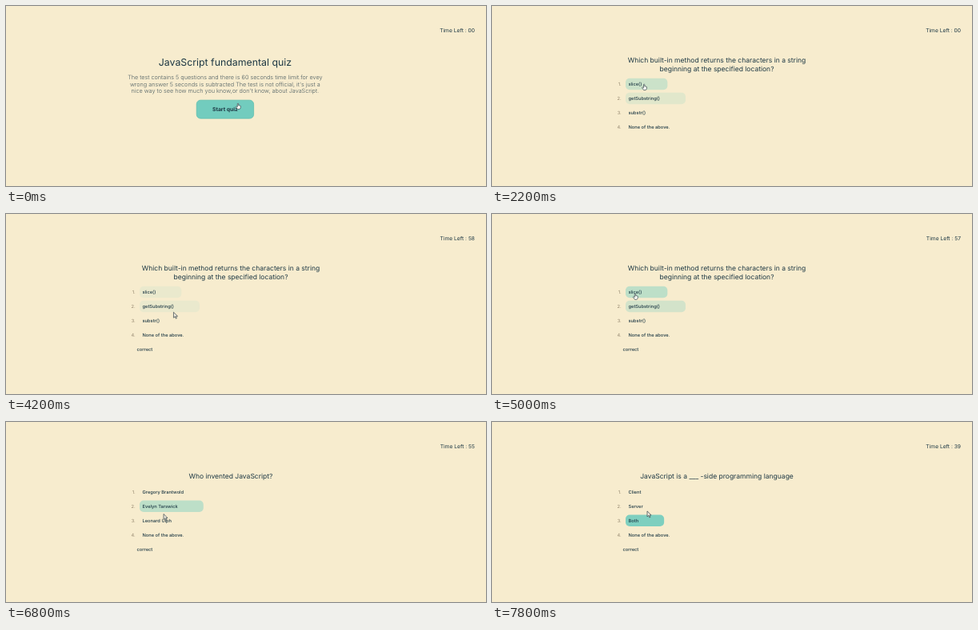
Animation of 600x226 px, one loop 8 s. Source, as an HTML page with a canvas:

```html
<!DOCTYPE html>
<html lang="en">
<head>
<meta charset="utf-8">
<title>JavaScript quiz</title>
<style>
  html, body { margin: 0; height: 100%; overflow: hidden; background: #f7ecce; }
  canvas { display: block; width: 600px; height: 226px; }
</style>
</head>
<body>
<canvas id="stage"></canvas>
<script>
const LOOP = 8000, STEP = 200, FADE = 600;
const BG = '#f7ecce', TEAL = '#72ccbe', INK = '#1d3844';
const OPTION_FONT = { size: 5.72, weight: 500 };
const LINE = 10.2, ROW = 18;

const canvas = document.getElementById('stage');
const ctx = canvas.getContext('2d');
const ratio = window.devicePixelRatio || 1;
canvas.width = 600 * ratio;
canvas.height = 226 * ratio;
ctx.scale(ratio, ratio);

const NONE = 'None of the above.';
const questions = [
  { from: 1600,
    title: ['Which built-in method returns the characters in a string',
            'beginning at the specified location?'],
    options: ['slice()', 'getSubstring()', 'substr()', NONE] },
  { from: 5900,
    title: ['Who invented JavaScript?'],
    options: ['Gregory Brantwold', 'Evelyn Tarswick', 'Leonard Ulph', NONE] },
  { from: 7200,
    title: ['JavaScript is a ___ -side programming language'],
    options: ['Client', 'Server', 'Both', NONE] },
];

// The pointer eases from stop to stop: time, x, y of its tip.
const stops = [
  [0, 290, 122], [700, 114, 217], [1400, 279, 126],
  [2300, 187, 97], [3600, 187, 97], [3800, 213, 126], [4000, 213, 126],
  [5000, 179, 99.8], [6400, 179, 99.8], [6800, 197, 115.5],
  [7700, 192, 122], [7800, 194, 111.9],
];

function pointerAt(t) {
  const next = stops.findIndex(stop => stop[0] > t);
  const [t1, x1, y1] = stops.at(next < 0 ? -1 : next);
  const [t0, x0, y0] = stops.at(next < 0 ? -1 : Math.max(next - 1, 0));
  const u = t1 > t0 ? (t - t0) / (t1 - t0) : 0;
  const eased = u * u * (3 - 2 * u);
  return { x: x0 + (x1 - x0) * eased, y: y0 + (y1 - y0) * eased };
}

const questionAt = t => questions.findLast(question => t >= question.from);

function setFont({ size, weight = 400 }) {
  ctx.font = `${weight} ${size}px Inter, sans-serif`;
  ctx.textRendering = 'geometricPrecision';
}

function text(string, x, y, font, align = 'left', color = INK) {
  setFont(font);
  ctx.textAlign = align;
  ctx.fillStyle = color;
  ctx.fillText(string, x, y);
}

function optionBox({ title, options }, row) {
  setFont(OPTION_FONT);
  const middle = 77.6 + title.length * LINE + row * ROW;
  return { middle, width: ctx.measureText(options[row]).width + 35.5 };
}

// Row under the pointer, or -1.
function rowAt(t) {
  const question = questionAt(t);
  if (!question) return -1;
  const { x, y } = pointerAt(t);
  return question.options.findIndex((_, row) => {
    const { middle, width } = optionBox(question, row);
    return x > 167 && x < 167 + width && Math.abs(y - middle) < 6;
  });
}

// A row's tint is the share of the last FADE ms that the pointer spent on it.
function hoverAmounts(t) {
  const amounts = [0, 0, 0, 0], samples = 30;
  for (let i = 0; i < samples; i++) {
    const row = rowAt(t - i * FADE / samples);
    if (row >= 0) amounts[row] += 1 / samples;
  }
  return amounts;
}

function roundBox(x, y, width, height) {
  ctx.beginPath();
  ctx.roundRect(x, y, width, height, 5);
  ctx.fillStyle = TEAL;
  ctx.fill();
}

function drawHome() {
  text('JavaScript fundamental quiz', 273.9, 75, { size: 12.33 }, 'center');
  ['The test contains 5 questions and there is 60 seconds time limit.for evey',
   "wrong answer 5 seconds is subtracted The test is not official, it's just a",
   "nice way to see how much you know,or don't know, about JavaScript."]
    .forEach((line, i) => text(line, 273.8, 92 + i * 8.6,
      { size: 7.25, weight: 300 }, 'center', '#4b5c60'));
  roundBox(238.2, 118.2, 71.4, 23);
  ctx.strokeStyle = '#58bcad';
  ctx.lineWidth = 0.7;
  ctx.stroke();
  text('Start quiz', 274, 132, { size: 6.75, weight: 700 }, 'center');
}

function drawQuestion(question, t) {
  question.title.forEach((line, i) =>
    text(line, 281, 71.3 + i * LINE, { size: 8.53 }, 'center'));
  const hover = hoverAmounts(t);
  question.options.forEach((option, row) => {
    const { middle, width } = optionBox(question, row);
    ctx.globalAlpha = hover[row];
    roundBox(167, middle - 7.2, width, 14.4);
    ctx.globalAlpha = 1;
    text(`${row + 1}.`, 161.7, middle + 2, { size: 5.72 }, 'right', '#91846c');
    text(option, 170.5, middle + 2, OPTION_FONT);
  });
  if (t >= 2800) {
    const { middle } = optionBox(question, 3);
    text('correct', 163.5, middle + ROW + 2, OPTION_FONT);
  }
}

const arrow = new Path2D('M0 0V7L1.7 5.4L2.8 8L4 7.5L2.9 5H5.1Z');
const hand = new Path2D('M-.7 .6Q0-.5.7 .6V3Q1.5 2.5 2 3.2Q3 2.8 3.3 3.7'
  + 'L3.2 5.6Q3 7.2 1.8 7.6H-.5Q-1.5 6.5-2.6 4.6Q-2.4 3.7-1.5 4.1L-.7 4.8Z');

function drawPointer(t) {
  const { x, y } = pointerAt(t);
  const onStart = !questionAt(t) && Math.abs(x - 274) < 36 && Math.abs(y - 130) < 12;
  const isHand = onStart || rowAt(t) >= 0;
  const shape = isHand ? hand : arrow;
  ctx.save();
  ctx.translate(x, y);
  ctx.fillStyle = isHand ? '#f8faf5' : '#eee9dc';
  ctx.strokeStyle = '#34434a';
  ctx.lineWidth = 0.7;
  ctx.fill(shape);
  ctx.stroke(shape);
  ctx.restore();
}

function timeLeft(t) {
  if (t < 2600) return '00';
  const penalty = t >= 7200 ? 15 : 0;
  return 59 - Math.floor((t - 2600) / 1000) - penalty;
}

function draw() {
  const t = Math.floor(performance.now() % LOOP / STEP) * STEP;
  ctx.fillStyle = BG;
  ctx.fillRect(0, 0, 600, 226);
  text(`Time Left : ${timeLeft(t)}`, 586, 33, { size: 6.7 }, 'right');
  const question = questionAt(t);
  if (question) drawQuestion(question, t);
  else drawHome();
  drawPointer(t);
  requestAnimationFrame(draw);
}
requestAnimationFrame(draw);
</script>
</body>
</html>
```
